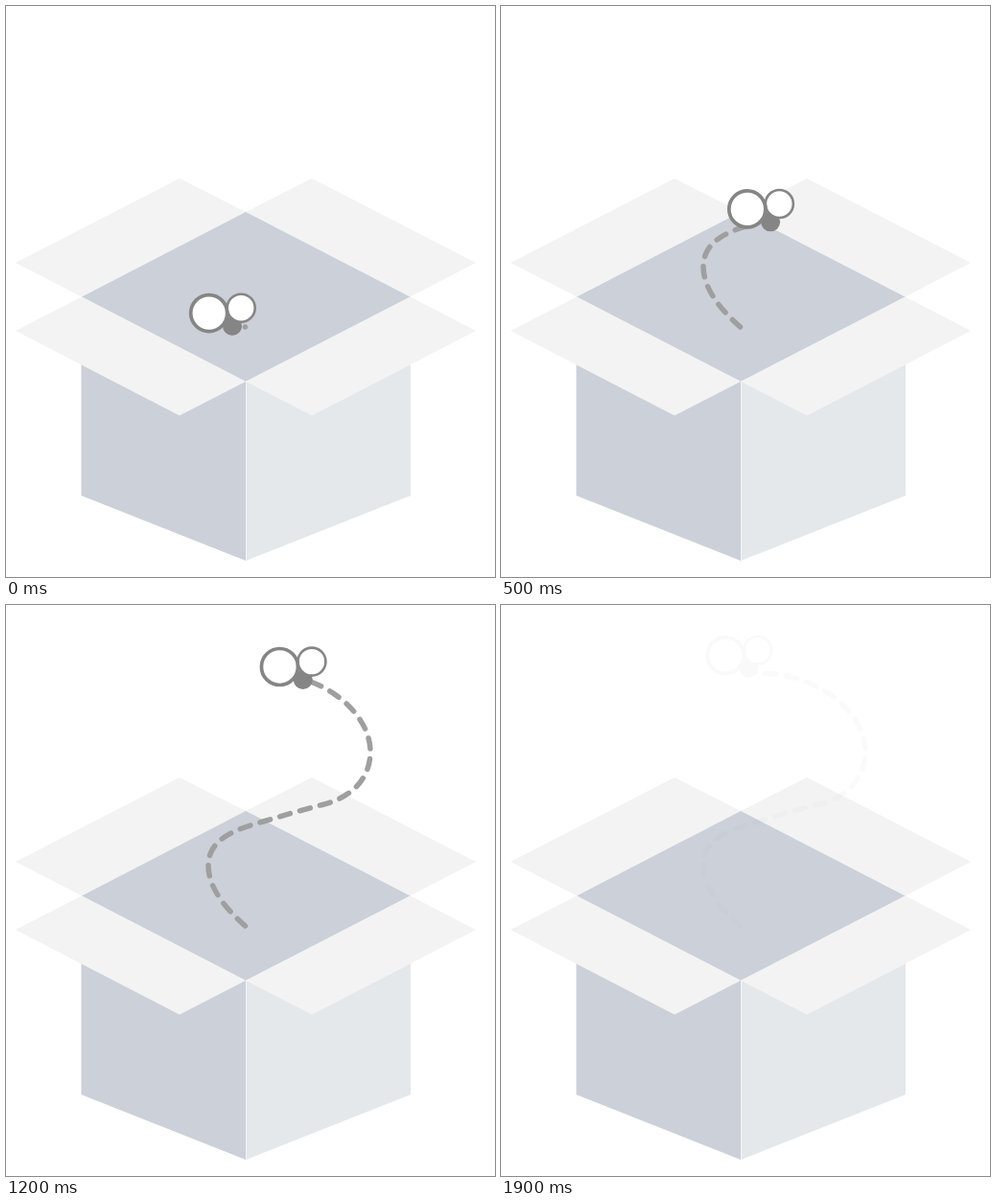
An HTML page that plays this animation: 510 by 596 pixels, repeating every 2000 ms.

```html
<!DOCTYPE html>
<html lang="en">
<head>
<meta charset="utf-8">
<title>Fly leaving an open box</title>
<style>
  html, body { margin: 0; width: 100%; height: 100%; overflow: hidden; background: #fff; }
  svg { display: block; width: 100%; height: 100%; }
  .flap { fill: #f3f3f3; }
  .shade { fill: #cbd0d9; }
  .side { fill: #e4e8eb; }
  .eye { fill: #fff; stroke: #858585; }
</style>
</head>
<body>
<svg viewBox="0 0 510 596">
  <defs>
    <path id="flight" d="M236 334C222 318 207 280 222 255C236 231 300 222 346 209C386 197 386 148 360 119C348 104 330 88 310 78C295 71 277 66 258.5 66"/>
  </defs>
  <path class="shade" d="M250 214.5 422 303.5 250 392 78.5 303.5Z"/>
  <path class="shade" d="M78.5 374V511L250 579V391L181 427Z"/>
  <path class="side" d="M250 391V579L422 511V374L319 427Z"/>
  <path d="M250.5 392V578" stroke="#f3f5f6"/>
  <path class="flap" d="M181 180 250 215 79 303.5 10 268Z"/>
  <path class="flap" d="M319 180 490 268 421.5 303.5 250 215Z"/>
  <path class="flap" d="M79 303.5 250 392 181 427.5 10 339Z"/>
  <path class="flap" d="M421.5 303.5 490 339 319 427.5 250 392Z"/>
  <g id="scene">
    <path id="trail" pathLength="437" fill="none" stroke="#9f9f9f" stroke-width="5.5" stroke-linecap="round"
      d="M249.5 335C236 323 211 299 211 272C211 242 244 233 270 225.5C290 219.5 310 213.5 330 208.5C362 200.5 380 180 380 153C380 114 334 73.5 276 71.5"/>
    <g id="fly">
      <circle r="10" fill="#858585"/>
      <circle class="eye" cx="9.2" cy="-18.8" r="14.5" stroke-width="2.6"/>
      <circle class="eye" cx="-24.3" cy="-13.4" r="19" stroke-width="3.7"/>
    </g>
  </g>
</svg>
<script>
  const LOOP = 2000, STEP = 100;
  const TRAIL = 437, DASH = 11, GAP = 10.3;
  const [scene, trail, flight, fly] =
    ['scene', 'trail', 'flight', 'fly'].map(id => document.getElementById(id));
  const flightLength = flight.getTotalLength();

  const clamp = x => Math.min(1, Math.max(0, x));

  // Seconds to share of the flight: speed up, cruise, slow down to a stop.
  function flown(t, speedUp = .126, slowDown = 1.12, stop = 1.57) {
    const speed = 2 / (slowDown + stop - speedUp);
    if (t < speedUp) return speed * t * t / (2 * speedUp);
    if (t < slowDown) return speed * (t - speedUp / 2);
    const rest = Math.max(0, stop - t);
    return 1 - speed * rest * rest / (2 * (stop - slowDown));
  }

  const drawn = t => clamp(.835 * (t - .09));
  const opacity = t => (1 + Math.cos(Math.PI * clamp((t - 1.28) / .71))) / 2;

  function dashesUpTo(head) {
    const dashes = [];
    for (let start = 0; start <= head; start += DASH + GAP) {
      dashes.push(Math.max(.05, Math.min(DASH, head - start)), GAP);
    }
    dashes[dashes.length - 1] = TRAIL;
    return dashes.join(' ');
  }

  function render(time) {
    const t = Math.floor(time / STEP) * STEP / 1000;
    const { x, y } = flight.getPointAtLength(flown(t) * flightLength);
    fly.setAttribute('transform', `translate(${x} ${y})`);
    trail.setAttribute('stroke-dasharray', dashesUpTo(drawn(t) * TRAIL));
    scene.setAttribute('opacity', opacity(t));
  }

  const begin = performance.now();
  function tick() {
    render((performance.now() - begin) % LOOP);
    requestAnimationFrame(tick);
  }
  tick();
</script>
</body>
</html>
```
